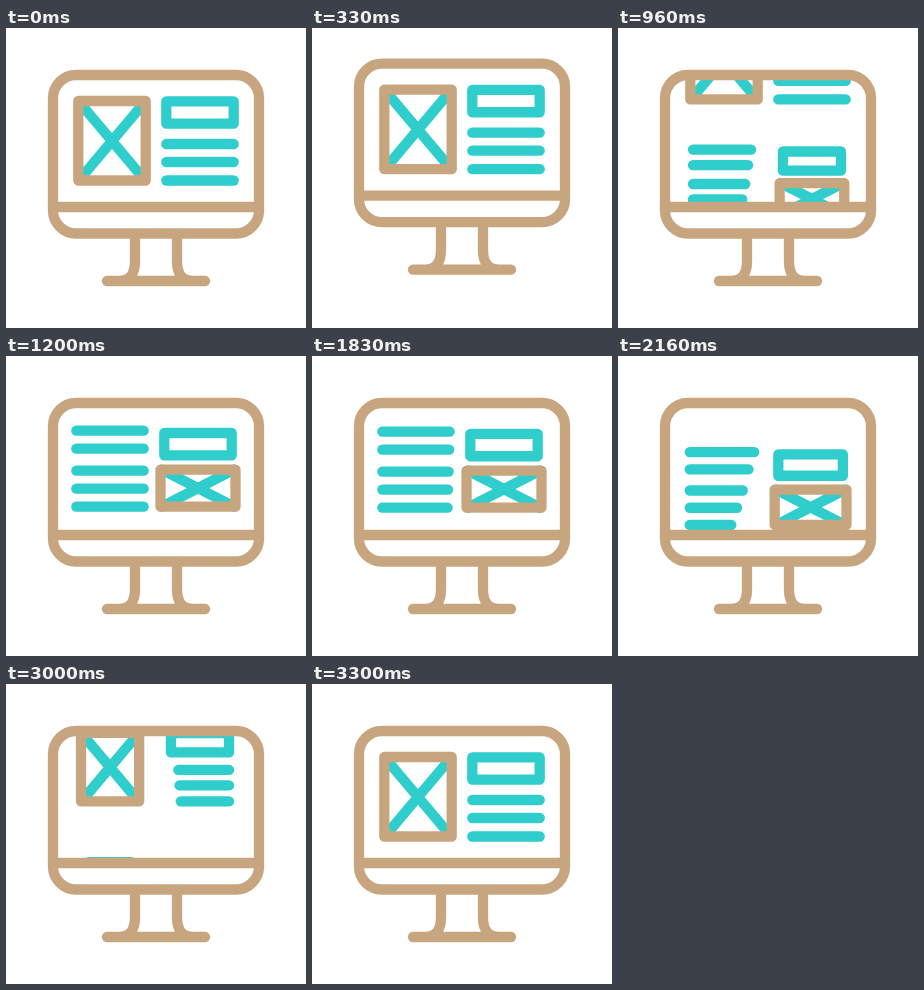
Animation, 300 px wide and 300 px high, one loop 3.6 s. Source, as an HTML page:

```html
<!DOCTYPE html>
<html lang="en">
<head>
<meta charset="utf-8">
<title>Scrolling monitor</title>
<style>
  html, body { margin: 0; width: 100%; height: 100%; overflow: hidden; background: #fff; }
  svg { display: block; width: 300px; height: 300px; }
  svg * { fill: none; stroke-linecap: round; stroke-linejoin: round; vector-effect: non-scaling-stroke; }
  .tan { stroke: #c7a67f; stroke-width: 10.3; }
  .cyan { stroke: #30cdcd; stroke-width: 10.3; }
</style>
</head>
<body>
<svg viewBox="0 0 300 300">
  <clipPath id="screen"><rect x="50" y="52" width="200" height="122.5"/></clipPath>
  <g id="icon">
    <g clip-path="url(#screen)">
      <!-- columns are drawn around their own centre so they can scale in place -->
      <g id="aLeft">
        <path class="cyan" d="M-32-38L32 38M32-38L-32 38"/>
        <rect class="tan" x="-33.7" y="-40" width="67.4" height="79.5"/>
      </g>
      <g id="aRight">
        <rect class="cyan" x="-33.7" y="-39.7" width="67.4" height="22.3"/>
      </g>
      <g id="bLeft"></g>
      <g id="bRight">
        <rect class="cyan" x="-33.7" y="-35.7" width="67.4" height="22.3"/>
        <path class="cyan" d="M-36 1L36 38M36 1L-36 38"/>
        <rect class="tan" x="-37.5" y="1" width="75" height="37"/>
      </g>
    </g>
    <g class="tan">
      <rect x="47" y="47" width="206" height="158.5" rx="23"/>
      <path d="M47 179H253M129 206V233Q129 253 113 253M171 206V233Q171 253 187 253M101 253H199"/>
    </g>
  </g>
</svg>
<script>
const LOOP = 3600, HALF = 33.7;
const $ = id => document.getElementById(id);
const progress = (t, from, to) => Math.min(1, Math.max(0, (t - from) / (to - from)));

function addLines(column, rows) {
  return rows.map(y => {
    const line = document.createElementNS("http://www.w3.org/2000/svg", "path");
    line.setAttribute("class", "cyan");
    column.append(line);
    return (x1, x2) => line.setAttribute("d", `M${x1} ${y}H${x2}`);
  });
}
const aLines = addLines($("aRight"), [3, 21, 39.5]);
const bLines = addLines($("bLeft"), [-38, -20, 2, 20, 38]);

function place(id, x, y, scale) {
  $(id).setAttribute("transform", `translate(${x} ${y}) scale(${scale})`);
}

function pageA(offset, scale, hidden) {
  place("aLeft", 106 - 14 * (1 - scale), 113 + offset, scale);
  place("aRight", 194, 113 + offset, scale);
  aLines.forEach((draw, i) => draw(-HALF + 2 * HALF * hidden * (0.8 + 0.13 * i), HALF));
}

function pageB(offset, scale, hidden) {
  place("bLeft", 104, 112.7 + offset, scale);
  place("bRight", 192 + 14 * (1 - scale), 112.7 + offset, scale);
  bLines.forEach((draw, i) => draw(-HALF, HALF - 2 * HALF * Math.min(1, hidden * i)));
}

function render(t) {
  const hop = 6 * (1 - Math.cos(2 * Math.PI * progress(t, 90, 510)));
  $("icon").setAttribute("transform", `translate(0 ${-hop})`);

  if (t < 1800) {
    const p = progress(t, 510, 1200);
    pageA(-124 * p, 1, 0);
    pageB(120 * (1 - p), 1 - 0.4 * (1 - p), 0.145 * (1 - p));
  } else {
    const p = progress(t, 1800, 3300), rest = 1 - p;
    pageA(-149 * rest, 1 - 0.69 * rest, Math.min(1, 1.32 * rest ** 1.31));
    pageB(118 * p ** 1.25, 1 - 0.55 * p ** 1.8, 0.37 * p);
  }
}

function frame(now) {
  render(now % LOOP);
  requestAnimationFrame(frame);
}
render(0);
requestAnimationFrame(frame);
</script>
</body>
</html>
```
